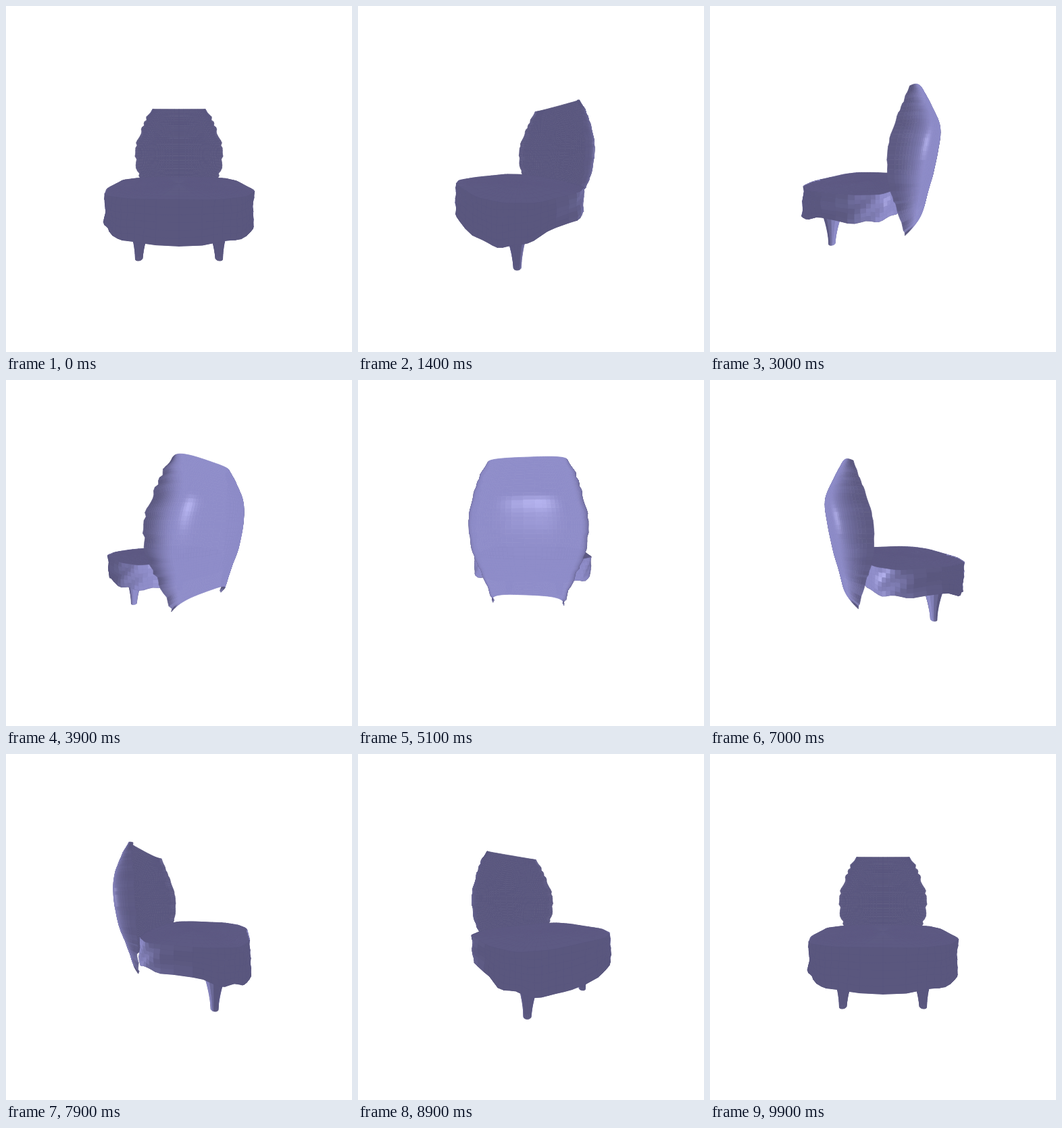
Animation, 512 px wide and 512 px high, one loop 10 s. Source, as an HTML page with a canvas:

```html
<!DOCTYPE html>
<html lang="en">
<head>
<meta charset="utf-8">
<title>Turning bone</title>
<style>
html, body { margin: 0; width: 100%; height: 100%; overflow: hidden; background: #fff; }
canvas { display: block; width: 512px; height: 512px; }
</style>
</head>
<body>
<canvas id="stage" width="512" height="512"></canvas>
<script>
const ctx = document.getElementById('stage').getContext('2d');
const STEP = 100, STEPS = 100, TURN = 99;
const CX = 256, HORIZON = 214, EYE = 250;
const DARK = [90, 87, 126], LIT = [143, 141, 201];
const ROUND = 0.6;

// Upright plate, top to bottom: height, half width, depth of the side edge, depth of the back
const PROFILE = [
  [73, 48, 48, 60],
  [55, 57, 44, 70],
  [30, 65, 36, 80],
  [0, 72, 30, 77],
  [-35, 68, 30, 70],
  [-65, 56, 36, 64],
  [-98, 43, 42, 58]
];

const clamp = v => Math.max(0, Math.min(1, v));
const soft = v => Math.sign(v) * Math.abs(v) ** ROUND;
const sub = (a, b) => a.map((v, i) => v - b[i]);
const dot = (a, b) => a[0] * b[0] + a[1] * b[1] + a[2] * b[2];
const cross = (a, b) => [a[1] * b[2] - a[2] * b[1], a[2] * b[0] - a[0] * b[2], a[0] * b[1] - a[1] * b[0]];
const unit = a => {
  const len = Math.hypot(...a) || 1;
  return a.map(v => v / len);
};

// Catmull-Rom through the rows of the profile, v from 0 to 1.
function profile(v) {
  const last = PROFILE.length - 1, s = v * last, k = Math.min(last - 1, Math.floor(s)), f = s - k;
  const row = i => PROFILE[Math.max(0, Math.min(last, i))];
  return row(k).map((b, c) => {
    const a = row(k - 1)[c], d = row(k + 1)[c], e = row(k + 2)[c];
    return b + f * (d - a + f * (2 * a - 5 * b + 4 * d - e + f * (3 * (b - d) + e - a))) / 2;
  });
}

// Half-open shell, u from one side edge over the back to the other.
function plate(u, v) {
  const [y, w, side, back] = profile(v);
  const a = (u - 0.5) * Math.PI, c = soft(Math.max(0, Math.cos(a)));
  const rim = Math.abs(2 * u - 1) ** 4;
  const ripple = 1.6 * rim * Math.sin(y * 0.42 + 2 * Math.sin(y * 0.13));
  const lift = 18 * c * clamp(v * 3 - 2) + 3 * c * clamp(1 - v * 4);
  return [(w + ripple) * soft(Math.sin(a)), y + lift, -side - (back - side) * c];
}

// Rounded box in front of the plate: top cap, wall, bottom cap.
function shelf(u, v) {
  const a = u * 2 * Math.PI, s = Math.sin(a);
  const top = -45, bottom = -72 - 14 * Math.max(0, s) + 1.5 * Math.sin(a * 11);
  const r = Math.min(1, v * 3, 3 - v * 3);
  const y = top + (bottom - top) * clamp(v * 3 - 1);
  const bump = 1 + 0.018 * Math.sin(a * 9 + y * 0.1) * Math.sin(y * 0.2 + a * 3);
  return [86 * r * bump * soft(Math.cos(a)), y, 22 + (s > 0 ? 73 : 57) * r * bump * soft(s)];
}

const prong = side => (u, v) => {
  const a = u * 2 * Math.PI, r = 4 + 13 * (1 - v) ** 1.6;
  return [side * (44 + 2 * v) + r * Math.cos(a), -72 - 52 * v, 56 + r * Math.sin(a)];
};

// Cuts a surface into facets whose normals point away from the core.
function mesh(shape, cols, rows, core) {
  const facets = [];
  for (let j = 0; j < rows; j++) {
    for (let i = 0; i < cols; i++) {
      const at = (p, q) => shape((i + p) / cols, (j + q) / rows);
      const pts = [at(0, 0), at(1, 0), at(1, 1), at(0, 1)];
      const mid = [0, 1, 2].map(c => pts.reduce((sum, p) => sum + p[c], 0) / 4);
      const n = unit(cross(sub(pts[2], pts[0]), sub(pts[3], pts[1])));
      const out = dot(n, sub(mid, core)) < 0 ? n.map(x => -x) : n;
      facets.push({ pts, mid, n: out });
    }
  }
  return facets;
}

const FACETS = [
  ...mesh(plate, 56, 44, [0, -10, -32]),
  ...mesh(shelf, 64, 18, [0, -62, 22]),
  ...mesh(prong(1), 14, 8, [45, -95, 56]),
  ...mesh(prong(-1), 14, 8, [-45, -95, 56])
];

// The light turns with the bone and falls on its back.
function shade(facet, eye) {
  const view = unit(sub(eye, facet.mid));
  const n = dot(facet.n, view) < 0 ? facet.n.map(x => -x) : facet.n;
  const light = clamp(1.15 * -n[2] + 0.06);
  const half = unit([view[0], view[1], view[2] - 1]);
  const glint = light * 38 * Math.max(0, dot(n, half)) ** 90;
  return `rgb(${DARK.map((d, i) => Math.round(d + (LIT[i] - d) * light + glint))})`;
}

function draw(step) {
  const angle = 2 * Math.PI * (step % TURN) / TURN;
  const cos = Math.cos(angle), sin = Math.sin(angle);
  const eye = [EYE * sin, 0, EYE * cos];
  const depth = p => p[0] * sin + p[2] * cos;
  const project = p => {
    const s = EYE / (EYE - depth(p));
    return [CX + (p[0] * cos - p[2] * sin) * s, HORIZON - p[1] * s];
  };
  ctx.fillStyle = '#fff';
  ctx.fillRect(0, 0, 512, 512);
  ctx.lineWidth = 0.7;
  ctx.lineJoin = 'round';
  const order = FACETS.map(f => ({ f, z: depth(f.mid) })).sort((a, b) => a.z - b.z);
  for (const { f } of order) {
    ctx.fillStyle = ctx.strokeStyle = shade(f, eye);
    ctx.beginPath();
    f.pts.forEach(p => ctx.lineTo(...project(p)));
    ctx.closePath();
    ctx.fill();
    ctx.stroke();
  }
}

const start = performance.now();
let shown = -1;
function frame() {
  const step = Math.floor((performance.now() - start) / STEP) % STEPS;
  if (step !== shown) draw(shown = step);
  requestAnimationFrame(frame);
}
frame();
</script>
</body>
</html>
```
